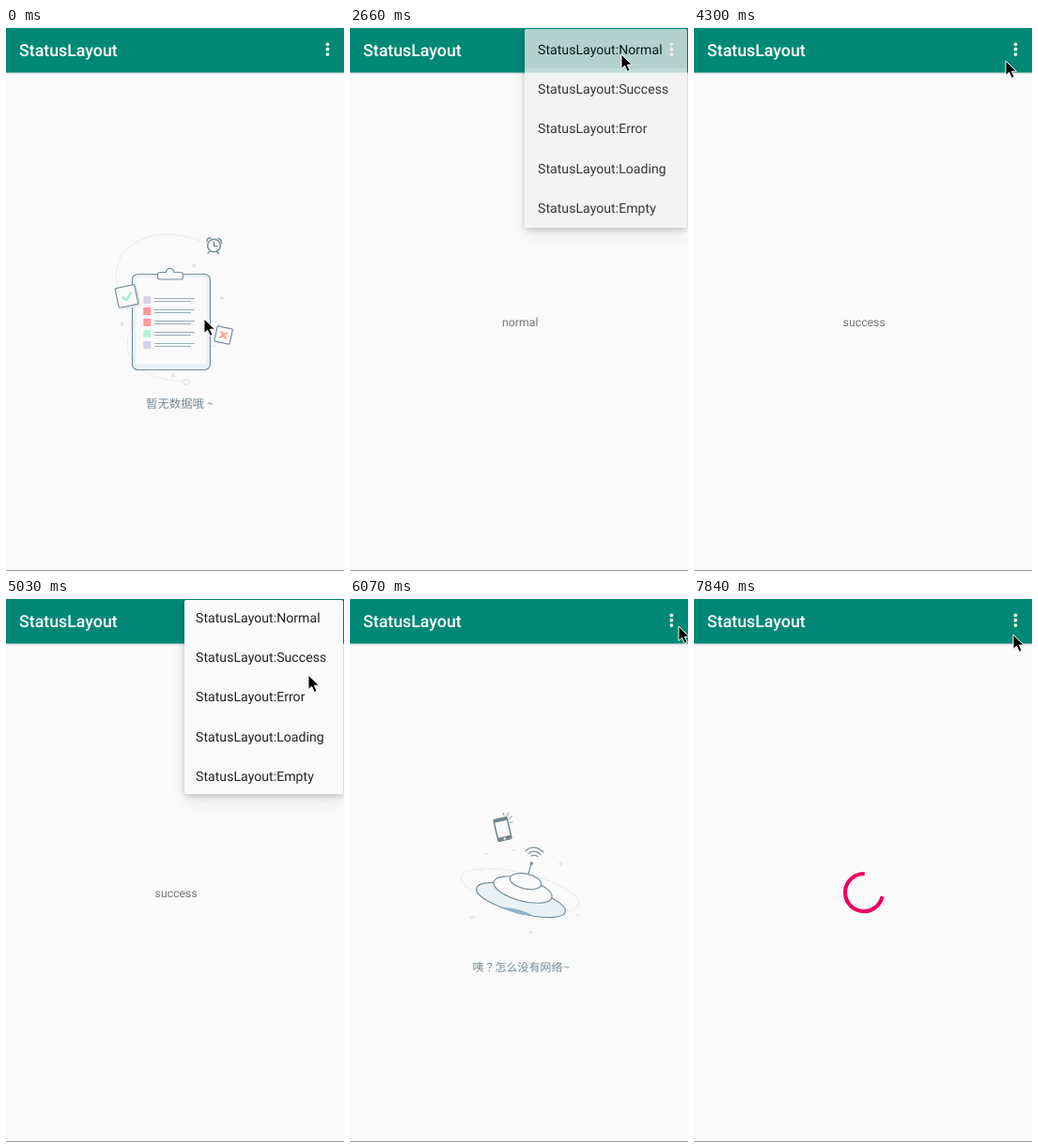
Write an HTML page that moves like this. It is 360 by 579 pixels and loops after 7.99 s.

```html
<!DOCTYPE html>
<html lang="zh-CN">
<head>
<meta charset="utf-8">
<title>StatusLayout</title>
<style>
  html, body { margin: 0; width: 100%; height: 100%; overflow: hidden; background: #fafafa; }
  body { position: relative; font-family: Roboto, sans-serif; text-rendering: geometricPrecision; }
  svg { position: absolute; left: 0; top: 0; display: block; }
  .title { font: 500 17.75px Roboto, sans-serif; fill: #fff; }
  .label { font: 12.3px Roboto, sans-serif; fill: #757575; text-anchor: middle; }
  .hint { font-family: "Noto Sans CJK SC", "Noto Sans CJK", sans-serif; font-weight: 500; fill: #768a96; }
  .centred { font-family: "Noto Sans CJK TC", "Noto Sans CJK", sans-serif; }
  .ink { fill: none; stroke: #78909c; stroke-width: 1.2; stroke-linecap: round; stroke-linejoin: round; }
  .bold { stroke-width: 1.5; }
  .thin { stroke-width: .9; }
  .faint { fill: none; stroke: #dfe2e4; stroke-width: 1; }
  .dash { stroke-dasharray: 2 1.5; }
  .paper { fill: #fafafa; }
  .tint { fill: #eaf1f5; }
  #menu, #shade { position: absolute; top: 1px; border-radius: 2px; }
  #menu {
    overflow: hidden; color: #222;
    font-size: 14.15px; line-height: 42.2px; white-space: nowrap;
  }
  #shade { box-shadow: 0 2px 6px rgba(0,0,0,.2), 0 8px 18px rgba(0,0,0,.07); }
  #menu div { height: 42.2px; }
  #menu span { display: block; }
</style>
</head>
<body>
<svg width="360" height="579" viewBox="0 0 360 579">
  <defs>
    <linearGradient id="fall" x2="0" y2="1">
      <stop stop-color="#000" stop-opacity=".16"/>
      <stop offset="1" stop-color="#000" stop-opacity="0"/>
    </linearGradient>
  </defs>
  <rect width="360" height="579" fill="#fafafa"/>

  <g class="view" data-name="empty">
    <path class="faint dash" d="M119 274C111 248 132 220 174 220Q193 221 214 230"/>
    <path class="faint dash" d="M134 318C122 342 132 373 188 377"/>
    <path class="faint dash" d="M218 313Q228 313 228 320M226 336Q222 340 218 339"/>
    <circle class="faint" cx="192" cy="377.5" r="3"/>
    <path fill="#dfe2e4" d="M197 253.5l4.500-3v5.500zM228.500 285.500l5 2.500-5 2.500zM120 316l5-3v5.500zM175.500 372l2.500-5 2.500 5z"/>
    <g class="ink bold">
      <circle cx="221.5" cy="232" r="6.8"/>
      <path d="M221.500 228v4.500h3.500M217 238l-2 2M225 238.500l1.500 2M214 227.500q0-4 4-3.500M226 224.500q4 1 3.500 5"/>
    </g>
    <rect class="ink tint" x="134.5" y="262.5" width="83" height="102" rx="6"/>
    <rect class="paper" x="138.5" y="266" width="75" height="92" rx="3"/>
    <path class="ink paper" d="M164 260.500h6.500a4.200 4.200 0 0 1 8.400 0H186a2.500 2.500 0 0 1 2.500 2.500v2.500A2.500 2.500 0 0 1 186 268h-22a2.500 2.500 0 0 1-2.500-2.500V263a2.500 2.500 0 0 1 2.500-2.500z"/>
    <g id="rows"></g>
    <g transform="translate(128.5 286) rotate(-12)">
      <rect x="-8" y="-8" width="21" height="21" fill="#dfe5e9"/>
      <rect class="ink paper" x="-10.5" y="-10.5" width="21" height="21" rx="1"/>
      <path d="M-5 0l4 4 7-7.500" fill="none" stroke="#aeebd2" stroke-width="2.6"/>
    </g>
    <g transform="translate(231.7 327.5) rotate(12)">
      <rect class="ink paper" x="-8.3" y="-8.3" width="16.6" height="16.6" rx="1"/>
      <path d="M-3.500-3.500l7 7m0-7l-7 7" stroke="#ffa0a0" stroke-width="2.2"/>
    </g>
    <text class="hint" x="149" y="405" font-size="12.4">暂无数据哦<tspan dx="3">~</tspan></text>
  </g>

  <text class="view label" data-name="normal" x="181.2" y="318">normal</text>
  <text class="view label" data-name="success" x="181.2" y="318">success</text>

  <g class="view" data-name="error">
    <ellipse class="faint dash" cx="181" cy="311" rx="64" ry="19" transform="rotate(13 181 311)"/>
    <path class="faint" d="M222 282h5m-2.500-2.500v5M190 355.500h5m-2.500-2.500v5M144 271.500h4M173 267.500h3M128 338.500h5m-5 2h5M240 337h4M138 289h3"/>
    <g transform="translate(162.5 245.5) rotate(-13)">
      <rect x="-8" y="-12.5" width="16" height="25" rx="2" fill="#71848f"/>
      <rect class="paper" x="-6.5" y="-8.5" width="13" height="16.5"/>
      <circle class="paper" cy="10.2" r="1.2"/>
    </g>
    <path class="ink thin" d="M164 231l-1-3M167.500 232l1-4M169.500 234.500l3-3M170.500 238h2.500"/>
    <g class="ink">
      <g transform="rotate(15 182 321)">
        <ellipse class="tint" cx="182" cy="321" rx="49" ry="14"/>
        <path d="M164 333.500q18 5 35 0q-16-4-35 0z" fill="#8fb3ca" stroke="none"/>
      </g>
      <ellipse class="paper" cx="184" cy="310" rx="32" ry="12" transform="rotate(15 184 310)"/>
      <ellipse class="paper" cx="187" cy="301" rx="17" ry="8" transform="rotate(12 187 301)"/>
      <path d="M190 293l3-10M187 268.500q9-8 19 1.500M190 271.500q7-5 13 1M193 274q4-2 7 .7"/>
      <circle cx="193.3" cy="282" r="1.2" fill="#78909c"/>
    </g>
    <text class="hint" x="130.5" y="396.5" font-size="12">咦<tspan class="centred" lang="zh-TW">？</tspan>怎么没有网络<tspan dx="1">~</tspan></text>
  </g>

  <path class="view" data-name="loading" id="spinner" fill="none" stroke="#ee0060" stroke-width="4.2"/>

  <rect y="47" width="360" height="3" fill="url(#fall)"/>
  <rect width="360" height="47.5" fill="#008876"/>
  <text class="title" x="14" y="29.7">StatusLayout</text>
  <circle id="ripple" cx="342.5" cy="22.5" r="17" fill="#fff" fill-opacity=".11"/>
  <g fill="#fff">
    <circle cx="342.5" cy="17.3" r="1.9"/>
    <circle cx="342.5" cy="22.7" r="1.9"/>
    <circle cx="342.5" cy="28.1" r="1.9"/>
  </g>
  <rect y="578" width="360" height="1" fill="#a0a0a0"/>
</svg>
<div id="shade"></div>
<div id="menu"></div>
<svg width="360" height="579" viewBox="0 0 360 579">
  <path id="cursor" d="M0 0V15.500L3.600 12.200 6.400 18.400 9.200 17.200 6.400 11.200H11.500Z" fill="#000" stroke="#fff" stroke-width="1"/>
</svg>

<script>
const LOOP = 7990;
const $ = id => document.getElementById(id);

// [start ms, pointer x, pointer y, menu state]
const STEPS = [
  [0, 211, 310, ''],
  [740, 220, 286, ''], [890, 257, 192, ''], [1030, 298, 88, ''], [1180, 321, 30, ''], [1330, 327, 15, ''],
  [1630, 327, 15, 'ripple'], [1770, 327, 15, 'open'], [1920, 325, 16, 'full'],
  [2070, 311, 21, 'full'], [2210, 296, 26, 'full'], [2360, 289, 28, 'full'],
  [2660, 289, 28, 'row0'], [2800, 310, 27, ''], [2950, 336, 25, ''],
  [3250, 336, 25, 'ripple'], [3400, 336, 27, 'open'], [3550, 328, 46, 'full'], [3700, 322, 57, 'full'],
  [4000, 322, 57, 'row1'], [4150, 324, 52, ''], [4290, 332, 35, ''], [4440, 336, 26, ''],
  [4890, 336, 28, 'ripple'], [5030, 322, 81, 'open'], [5180, 314, 98, 'full'],
  [5330, 309, 104, 'full'], [5480, 308, 105, 'full'],
  [5780, 308, 105, 'row2'], [5920, 335, 60, ''], [6070, 350, 29, ''], [6220, 345, 25, ''],
  [6360, 343, 24, 'ripple'], [6510, 338, 45, 'open'], [6650, 318, 105, 'full'], [6800, 306, 139, 'full'],
  [6950, 303, 146, 'full'], [7090, 301, 149, 'full'],
  [7390, 301, 149, 'row3'], [7540, 313, 115, ''], [7690, 332, 60, ''], [7840, 340, 38, '']
];
const VIEWS = [[0, 'empty'], [2660, 'normal'], [4000, 'success'], [5780, 'error'], [7390, 'loading']];
const ITEMS = ['Normal', 'Success', 'Error', 'Loading', 'Empty'];

const views = [...document.querySelectorAll('.view')];
const menu = $('menu'), shade = $('shade');
const items = ITEMS.map(name => {
  const row = menu.appendChild(document.createElement('div'));
  row.appendChild(document.createElement('span')).textContent = 'StatusLayout:' + name;
  return row;
});

$('rows').innerHTML = ['#d6d1ee', '#ff9595', '#ff9c99', '#baf1da', '#d6d1ee'].map((color, i) => {
  const y = 286 + 12 * i;
  return `<rect x="146.3" y="${y}" width="8" height="8" fill="${color}"/>
    <path stroke="#9aacb6" d="M158 ${y + 2.5}h43M158 ${y + 5.5}h39"/>`;
}).join('');

const current = (table, time) => table.findLast(row => row[0] <= time);
const show = (el, on) => { el.style.display = on ? '' : 'none'; };

function arc(start, sweep) {
  const point = deg => {
    const a = deg * Math.PI / 180;
    return `${181 + 20 * Math.cos(a)} ${313 + 20 * Math.sin(a)}`;
  };
  return `M${point(start)}A20 20 0 ${sweep > 180 ? 1 : 0} 1 ${point(start + sweep)}`;
}

function drawMenu(state) {
  const pressed = state.startsWith('row') ? +state[3] : -1;
  const fading = pressed >= 0, opening = state === 'open';
  const visible = fading || opening || state === 'full';
  const left = opening ? 189.5 : 186;
  const right = opening ? 359 : 358.5;
  for (const box of [menu, shade]) {
    show(box, visible);
    box.style.left = left + 'px';
    box.style.width = right - left + 'px';
    box.style.height = (opening ? 207 : 211.5) + 'px';
  }
  menu.style.opacity = fading ? .78 : 1;
  menu.style.background = fading ? '#f2f2f2' : '#fafafa';
  menu.style.color = fading ? '#000' : '';
  items.forEach((row, i) => {
    const label = row.firstChild;
    label.style.paddingLeft = (opening ? 12.5 : 14) + 'px';
    label.style.transform = `translateY(${opening ? -1 : 1.5}px)`;
    row.style.background = i === pressed ? 'rgba(0,0,0,.05)' : 'none';
  });
}

function draw(time) {
  const [start, x, y, state] = current(STEPS, time);
  const view = current(VIEWS, time)[1];
  views.forEach(el => show(el, el.dataset.name === view));
  show($('ripple'), state === 'ripple');
  drawMenu(state);
  $('cursor').setAttribute('transform', `translate(${x} ${y})`);
  if (view === 'loading') {
    const p = (start - 7390) / 450;
    $('spinner').setAttribute('d', arc(-90 + 102 * p, 20 + 240 * p * p * (3 - 2 * p)));
  }
}

const origin = performance.now();
function tick() {
  draw((performance.now() - origin) % LOOP);
  requestAnimationFrame(tick);
}
tick();
</script>
</body>
</html>
```
